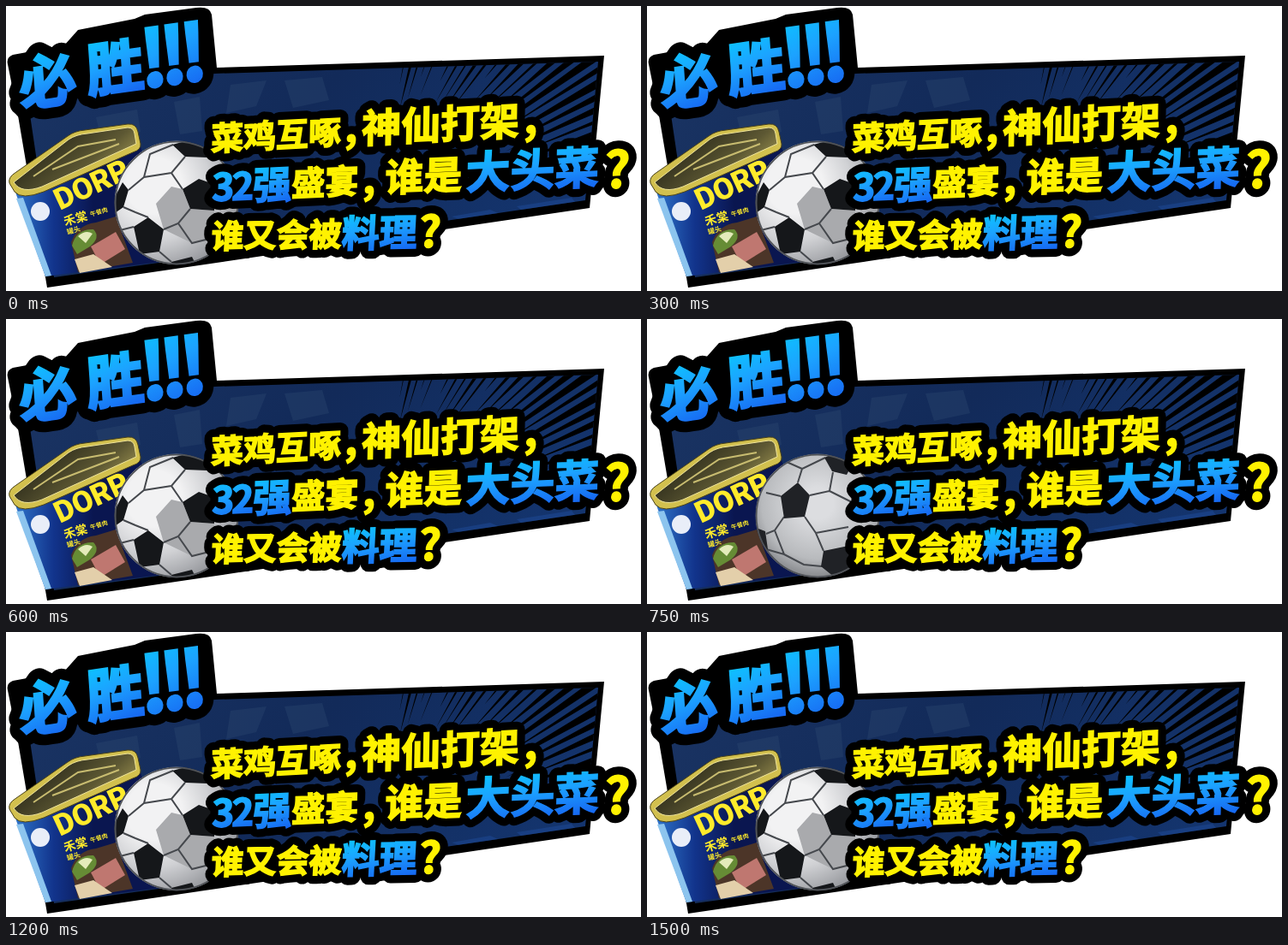
Recreate the animation shown at these times as an HTML page. Size 741 px wide and 333 px high, loop 2000 ms.

```html
<!DOCTYPE html>
<html lang="zh">
<head>
<meta charset="utf-8">
<style>
html, body { margin: 0; width: 100%; height: 100%; overflow: hidden; background: #fff; }
svg { display: block; width: 741px; height: 333px; }
text { font-family: "Noto Sans CJK SC", "Noto Sans CJK", sans-serif; font-weight: 900; }
#edges { stroke: #000; stroke-linejoin: round; }
.seam { fill: none; stroke: #45484d; stroke-width: 2; }
.brand { font-family: Roboto, sans-serif; }
</style>
</head>
<body>
<svg viewBox="0 0 741 333">
  <defs>
    <linearGradient id="navy" x2="1" y2=".3">
      <stop stop-color="#1b3564"/><stop offset=".5" stop-color="#122a59"/><stop offset="1" stop-color="#14356f"/>
    </linearGradient>
    <linearGradient id="sky" x2=".2" y2="1">
      <stop offset=".1" stop-color="#08ccff"/><stop offset=".55" stop-color="#1ca2ff"/><stop offset="1" stop-color="#1668f2"/>
    </linearGradient>
    <linearGradient id="lid" x2="1" y2=".6">
      <stop stop-color="#8a8143"/><stop offset=".35" stop-color="#35331f"/><stop offset=".7" stop-color="#5d5833"/><stop offset="1" stop-color="#a59a54"/>
    </linearGradient>
    <linearGradient id="tin" x2="1">
      <stop stop-color="#2f76cc"/><stop offset=".25" stop-color="#12348c"/><stop offset=".5" stop-color="#0a1650"/>
    </linearGradient>
    <radialGradient id="white" cx=".32" cy=".36" r=".75">
      <stop offset=".3" stop-color="#f2f2f3"/><stop offset=".6" stop-color="#d0d1d4"/><stop offset="1" stop-color="#8d8f94"/>
    </radialGradient>
    <radialGradient id="gray" cx=".5" cy=".4" r=".64">
      <stop offset=".2" stop-color="#dcdde0"/><stop offset=".7" stop-color="#b8babd"/><stop offset="1" stop-color="#77797d"/>
    </radialGradient>
    <clipPath id="panel"><path d="M24 100L244 79L691 65L676 227L236 292L56 317Z"/></clipPath>
    <clipPath id="disc"><circle cx="196" cy="231" r="72.5"/></clipPath>
  </defs>

  <path d="M2 68Q0 60 8 57L68 46L84 28L150 15L162 10L222 2Q238 0 240 10L246 72L698 58L681 236L48 329L14 128Z"/>
  <g clip-path="url(#panel)">
    <path d="M0 60H741V333H0Z" fill="url(#navy)"/>
    <path d="M105 130l48-9 4 26-46 8zM196 112l30-6 3 40-26 4zM262 92l42-5-12 30-35 8zM325 87l44-4 8 27-42 9z" fill="#2b466f" opacity=".4"/>
    <path d="M520 246l45-8 18 8-40 8zM596 234l64-10 8 10-60 10z" fill="#1f4a98" opacity=".5"/>
    <path id="rays"/>
  </g>

  <path d="M9 212L46 316L195 297L157 164Z" fill="url(#tin)"/>
  <path d="M12 225L20 224L53 315L46 316Z" fill="#8cc4ee"/>
  <path d="M4 207Q2 200 12 194L72 152Q80 146 92 145L142 138Q152 137 154 147L157 161Q158 168 148 171L44 217Q18 227 10 217Z" fill="#d2c04e" stroke="#4a4218"/>
  <path d="M9 206L73 156Q82 150 95 149L142 142Q149 142 150 149L152 161L42 211Q18 220 9 206Z" fill="url(#lid)" stroke="#efe49a"/>
  <path d="M32 199L84 164L128 156M54 191L132 161" fill="none" stroke="#c8bc70" stroke-width="2"/>
  <circle cx="40" cy="240" r="11" fill="#e9eef8"/>
  <path d="M76 276Q84 255 105 253L128 246L148 300L84 311Z" fill="#4c3528"/>
  <path d="M77 280Q82 260 102 261Q111 270 98 281L83 290Z" fill="#668c35"/>
  <path d="M84 269q9-8 17-3l-8 11z" fill="#e4ebba"/>
  <path d="M99 281L128 264L139 284L110 302Z" fill="#bf7770"/>
  <path d="M80 296L102 290L124 305L86 312Z" fill="#e3cfaa"/>
  <g fill="#ffeb2b">
    <text class="brand" transform="translate(63 239)rotate(-25)" font-size="35">DORP</text>
    <text transform="translate(69 257)rotate(-16)" font-size="14">禾棠</text>
    <text transform="translate(99 246)rotate(-17)" font-size="7">午餐肉</text>
    <text transform="translate(72 267)rotate(-16)" font-size="8">罐头</text>
  </g>

  <g clip-path="url(#disc)" transform="translate(3 -1)">
    <g id="ballA">
      <circle cx="196" cy="231" r="72.5" fill="url(#white)"/>
      <path d="M190 212L203 215L212 238L240 240V275L214 278L181 262L172 232Z" fill="#a9aaad"/>
      <path class="seam" d="M206 177L190 196L203 215M190 196L158 201L140 216M158 201L165 174L192 163M212 238L198 255L181 262M134 236L148 242L163 248M176 288L190 300M198 255L214 278L238 272M153 290L146 300M146 259L130 263"/>
      <path d="M191 163L214 157L238 163L232 178L206 177ZM146 259L163 248L181 262L176 288L153 291ZM203 215L222 203L242 210L240 240L212 238ZM122 228L133 207L140 216L134 236L124 243ZM190 300L214 294L220 306H192Z" fill="#15171a"/>
    </g>
    <g id="ballB">
      <circle cx="196" cy="231" r="72.5" fill="url(#gray)"/>
      <path class="seam" d="M173 192L178 176L205 163M187 207L210 202L214 180M210 202L238 216M181 232L194 251L203 272M194 251L232 244M157 232L146 248L136 252M146 248L157 276L136 270M157 276L180 288L201 290M153 208L136 204M178 176L160 168"/>
      <path d="M153 208L173 192L187 207L181 232L157 234ZM204 163L220 156L239 166L230 183L213 179ZM203 272L232 266L240 292L215 302L200 290ZM122 244L135 249L138 270L130 276Z" fill="#202226"/>
    </g>
    <circle cx="196" cy="231" r="71.5" fill="none" stroke="#505358" stroke-width="2"/>
  </g>

  <g id="edges"></g>
  <g id="faces"></g>
</svg>
<script>
const $ = id => document.getElementById(id);
const BLUE = "url(#sky)", YELLOW = "#fff200";

function addText(group, str, attrs) {
  const t = document.createElementNS("http://www.w3.org/2000/svg", "text");
  t.textContent = str;
  for (const k in attrs) t.setAttribute(k, attrs[k]);
  $(group).append(t);
}

// Each run gets a wide black edge below and a slightly thickened face above.
function write(edge, bold, str, x, y, size, angle, fill = YELLOW, spacing = 0) {
  const place = {
    transform: `translate(${x} ${y})rotate(${angle})skewX(-4)`,
    "font-size": size,
    "letter-spacing": spacing
  };
  addText("edges", str, { ...place, "stroke-width": edge });
  addText("faces", str, { ...place, fill, stroke: fill, "stroke-width": bold });
}

[
  ["菜鸡互啄", 239, 169, 38, -3],
  [",", 395, 159, 46, -3],
  ["神仙打架", 415, 160, 46, -3],
  [",", 604, 149, 50, -3],
  ["32", 240, 228, 44, -2.5, BLUE, -3],
  ["强", 288, 226, 45, -2.5, BLUE],
  ["盛宴", 333, 222, 39, -2.5],
  [",", 416, 219, 46, -2.5],
  ["谁是", 442, 217, 45, -2.5],
  ["大头菜", 536, 214, 52, -2.5, BLUE],
  ["?", 698, 213, 58, -2.5],
  ["谁又会被", 239, 283, 38, -1],
  ["料理", 391, 282, 44, -1, BLUE],
  ["?", 481, 282, 50, -1]
].forEach(run => write(20, 1.6, ...run));

[
  ["必", 17, 117, 67, -8, BLUE],
  ["胜", 96, 101, 67, -8, BLUE],
  ["!!!", 158, 96, 90, -8, BLUE, -10]
].forEach(run => write(28, 3, ...run));

// Dark speed lines fanning out towards the top right corner.
let seed = 7;
const rand = () => (seed = seed * 16807 % 2147483647) / 2147483647;
const polar = (r, a) => `${430 + r * Math.cos(a)} ${240 - r * Math.sin(a)}`;
let rays = "";
for (let a = 0.25; a < 1.45; a += 0.045) {
  const w = 0.008 + rand() * 0.014;
  rays += `M${polar(120 + rand() * 90, a)}L${polar(420, a - w)}L${polar(420, a + w)}Z`;
}
$("rays").setAttribute("d", rays);

function draw() {
  const step = Math.min(10, Math.floor(performance.now() % 2000 / 150));
  const turned = step % 2 === 1;
  $("ballA").style.display = turned ? "none" : "";
  $("ballB").style.display = turned ? "" : "none";
  requestAnimationFrame(draw);
}
draw();
</script>
</body>
</html>
```
